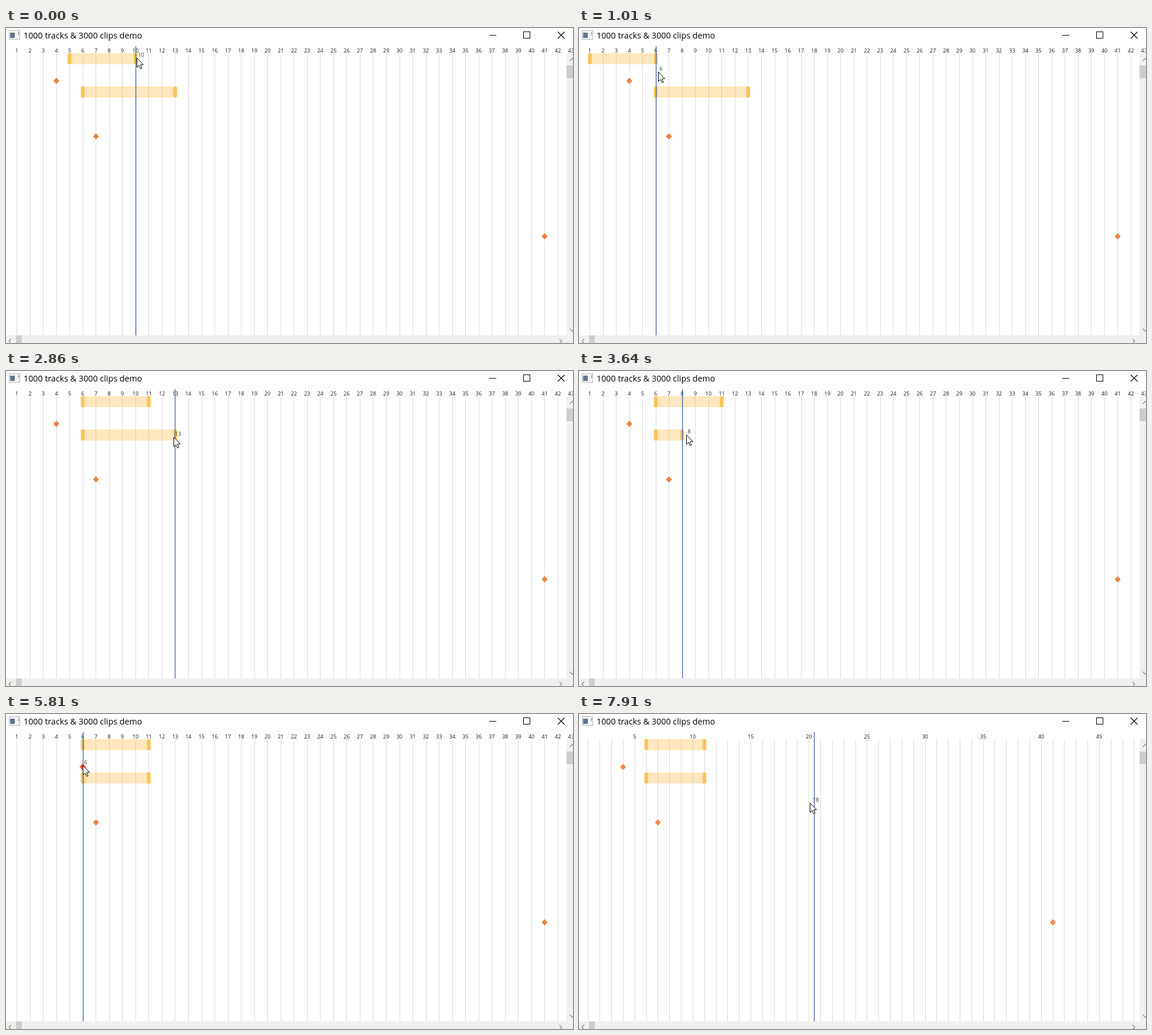
An HTML page with a canvas for the animation above (7990 ms loop, 968 by 539 pixels).

```html
<!DOCTYPE html>
<html lang="en">
<head>
<meta charset="utf-8">
<title>Timeline demo</title>
<style>
  html, body { margin: 0; width: 100%; height: 100%; overflow: hidden; background: #fff; }
  canvas { display: block; }
</style>
</head>
<body>
<canvas id="stage" width="968" height="539"></canvas>
<script>
const ctx = document.getElementById('stage').getContext('2d');
const LOOP = 7990, ORIGIN = -4.1, BASE_SCALE = 22.53;
const TOP = 43, BOTTOM = 526, RIGHT = 957;
const FONT = '"Open Sans", "Noto Sans", sans-serif';

const frameAt = x => Math.round((x - ORIGIN) / BASE_SCALE);
const xAt = (frame, scale) => ORIGIN + frame * scale;
const snap = x => Math.floor(x + 0.2);

// What the pointer drags, as a function of the frame under it.
const dragTop = (s, f) => { s.top = [f - 5, f]; };
const dragLow = (s, f) => { s.low = [f - 2, f + 3]; };
const dragLowEnd = (s, f) => { s.low = [6, f]; };
const dragKey = (s, f) => { s.key = f; };

// Waypoints: [step, x, y, pointer lead]; steps are spread evenly from start to end.
const moves = [
  { start: 80, end: 160, steps: 2, path: [[2, 216, 52]] },
  { start: 300, end: 1010, steps: 10, drag: dragTop, path: [[4, 383, 66], [10, 135, 76]] },
  { start: 1150, end: 1530, steps: 6, drag: dragTop, path: [[6, 200, 80]] },
  { start: 1780, end: 1850, steps: 2, drag: dragTop, path: [[2, 240, 81]] },
  { start: 1930, end: 2390, steps: 7, path: [[4, 299, 106], [7, 285, 114]] },
  { start: 2790, end: 2860, steps: 2, path: [[2, 286, 114]] },
  { start: 3090, end: 3490, steps: 6, drag: dragLowEnd, path: [[6, 147, 110]] },
  { start: 3640, end: 3800, steps: 3, drag: dragLowEnd, path: [[1, 183, 110], [3, 233, 112]] },
  { start: 3970, end: 4200, steps: 4, path: [[4, 183, 113]] },
  { start: 4280, end: 4740, steps: 7, drag: dragLow, path: [[3, 252, 114], [6, 177, 115], [7, 171, 113]] },
  { start: 4800, end: 5200, steps: 6, path: [[6, 85, 90]] },
  { start: 5430, end: 5660, steps: 4, path: [[4, 88, 88]] },
  { start: 5810, end: 6450, steps: 9, drag: dragKey, path: [[4, 260, 92], [9, 66, 95]] },
  { start: 6730, end: 6820, steps: 2, drag: dragKey, path: [[1, 73, 97, 5], [2, 81, 95]] },
  { start: 7130, end: 7290, steps: 3, path: [[3, 396.5, 153, -2.5]] }
];

function along(from, path, step) {
  let a = [0, from.x, from.y];
  for (const b of path) {
    if (step <= b[0]) {
      const p = (step - a[0]) / (b[0] - a[0]);
      const mix = i => a[i] + (b[i] - a[i]) * p;
      return { x: mix(1), y: mix(2), lead: step === b[0] ? b[3] || 0 : 0 };
    }
    a = b;
  }
}

function sceneAt(t) {
  const s = { top: [5, 10], low: [6, 13], key: 4, pointer: { x: 223, y: 52, lead: 0 } };
  for (const m of moves) {
    if (t < m.start) break;
    const gap = (m.end - m.start) / (m.steps - 1);
    const step = Math.min(m.steps, 1 + Math.floor((t - m.start + 8) / gap));
    s.pointer = along(s.pointer, m.path, step);
    if (m.drag) m.drag(s, frameAt(s.pointer.x));
  }
  s.hot = t >= 5430 && t < 7130;
  s.scale = t < 7830 ? BASE_SCALE : t < 7910 ? 21.18 : 19.83;
  s.labelEvery = t < 7910 ? 1 : 5;
  return s;
}

function rect(x, y, w, h, color) {
  ctx.fillStyle = color;
  ctx.fillRect(x, y, w, h);
}

function text(str, x, y, size, color, align = 'left') {
  ctx.font = `${size}px ${FONT}`;
  ctx.fillStyle = color;
  ctx.textAlign = align;
  ctx.fillText(str, x, y);
}

function trace(points, closed) {
  ctx.beginPath();
  points.forEach(([x, y]) => ctx.lineTo(x, y));
  if (closed) ctx.closePath();
}

function stroke(points, color, width = 1, closed = false) {
  trace(points, closed);
  ctx.strokeStyle = color;
  ctx.lineWidth = width;
  ctx.stroke();
}

function roundRect(x, y, w, h, r, color) {
  ctx.beginPath();
  ctx.roundRect(x, y, w, h, r);
  ctx.fillStyle = color;
  ctx.fill();
}

function drawTitleBar() {
  rect(5, 4, 19, 16, '#b4b8bc');
  rect(6, 5, 17, 14, '#f4f5f6');
  rect(7, 8, 8, 9, '#5f7596');
  rect(21, 7, 1, 5, '#777');
  text('1000 tracks & 3000 clips demo', 30, 18, 14.3, '#000');
  rect(825, 12, 12, 1, '#000');
  ctx.strokeStyle = '#000';
  ctx.lineWidth = 1;
  ctx.strokeRect(883.5, 6.5, 11, 11);
  stroke([[942, 6.5], [953.5, 18]], '#000', 1.1);
  stroke([[953.5, 6.5], [942, 18]], '#000', 1.1);
}

function drawScrollBars() {
  rect(RIGHT, TOP, 11, 496, '#f0f0f0');
  rect(0, BOTTOM, 968, 13, '#f0f0f0');
  rect(RIGHT, 64, 11, 22, '#cdcdcd');
  rect(17, BOTTOM, 10, 13, '#cdcdcd');
  const grey = '#8c8c8c';
  stroke([[962.5, 56.5], [967, 52], [971.5, 56.5]], grey, 1.3);
  stroke([[962.5, 514.5], [967, 519], [971.5, 514.5]], grey, 1.3);
  stroke([[9, 532], [5, 536], [9, 540]], grey, 1.3);
  stroke([[945, 532], [949, 536], [945, 540]], grey, 1.3);
}

function drawGrid(scale, labelEvery) {
  for (let f = 1; xAt(f, scale) < 980; f++) {
    const x = xAt(f, scale);
    if (x < RIGHT) rect(snap(x), TOP, 1, BOTTOM - TOP, '#dcdcdc');
    if (f % labelEvery === 0) text(f, x, 42, 9, '#1c1c1c', 'center');
  }
}

function drawClip([first, last], y, scale) {
  const a = xAt(first, scale), b = xAt(last, scale), half = 3.3;
  roundRect(a - half, y, b - a + 2 * half, 19, 2.5, 'rgba(255,165,0,.25)');
  for (const x of [a, b]) roundRect(x - half, y, 2 * half, 19, 2.5, 'rgba(255,165,0,.5)');
}

function drawKey(frame, y, scale, hot) {
  const x = xAt(frame, scale), w = hot ? 5.6 : 5, h = hot ? 6 : 5.5;
  trace([[x, y - h], [x + w, y], [x, y + h], [x - w, y]], true);
  ctx.fillStyle = hot ? '#ff573c' : scale === BASE_SCALE ? '#ea8343' : '#fa884a';
  ctx.fill();
}

function drawPointer(x, y) {
  ctx.save();
  ctx.translate(Math.round(x) + 0.5, Math.round(y) - 0.5);
  trace([[0, 0], [0, 16], [3.7, 12.6], [6.3, 18.2], [8.6, 17.2], [6.2, 11.6], [11, 11.2]], true);
  ctx.fillStyle = '#fff';
  ctx.fill();
  ctx.strokeStyle = '#000';
  ctx.lineWidth = 1;
  ctx.stroke();
  ctx.restore();
}

function draw(t) {
  const s = sceneAt(t), { x, y, lead } = s.pointer, frame = frameAt(x);
  rect(0, 0, 968, 539, '#fff');
  drawTitleBar();
  drawGrid(s.scale, s.labelEvery);
  drawClip(s.top, 43, s.scale);
  drawClip(s.low, 100, s.scale);
  drawKey(s.key, 90.5, s.scale, s.hot);
  drawKey(7, 185.5, s.scale);
  drawKey(41, 356.5, s.scale);
  rect(snap(xAt(frame, BASE_SCALE)), 31, 1.3, BOTTOM - 31, '#3f62b8');
  text(frame, x + 2.5, y - 3, 9, '#333');
  drawScrollBars();
  drawPointer(x + lead, y);
}

function tick() {
  draw(performance.now() % LOOP);
  requestAnimationFrame(tick);
}
tick();
</script>
</body>
</html>
```
